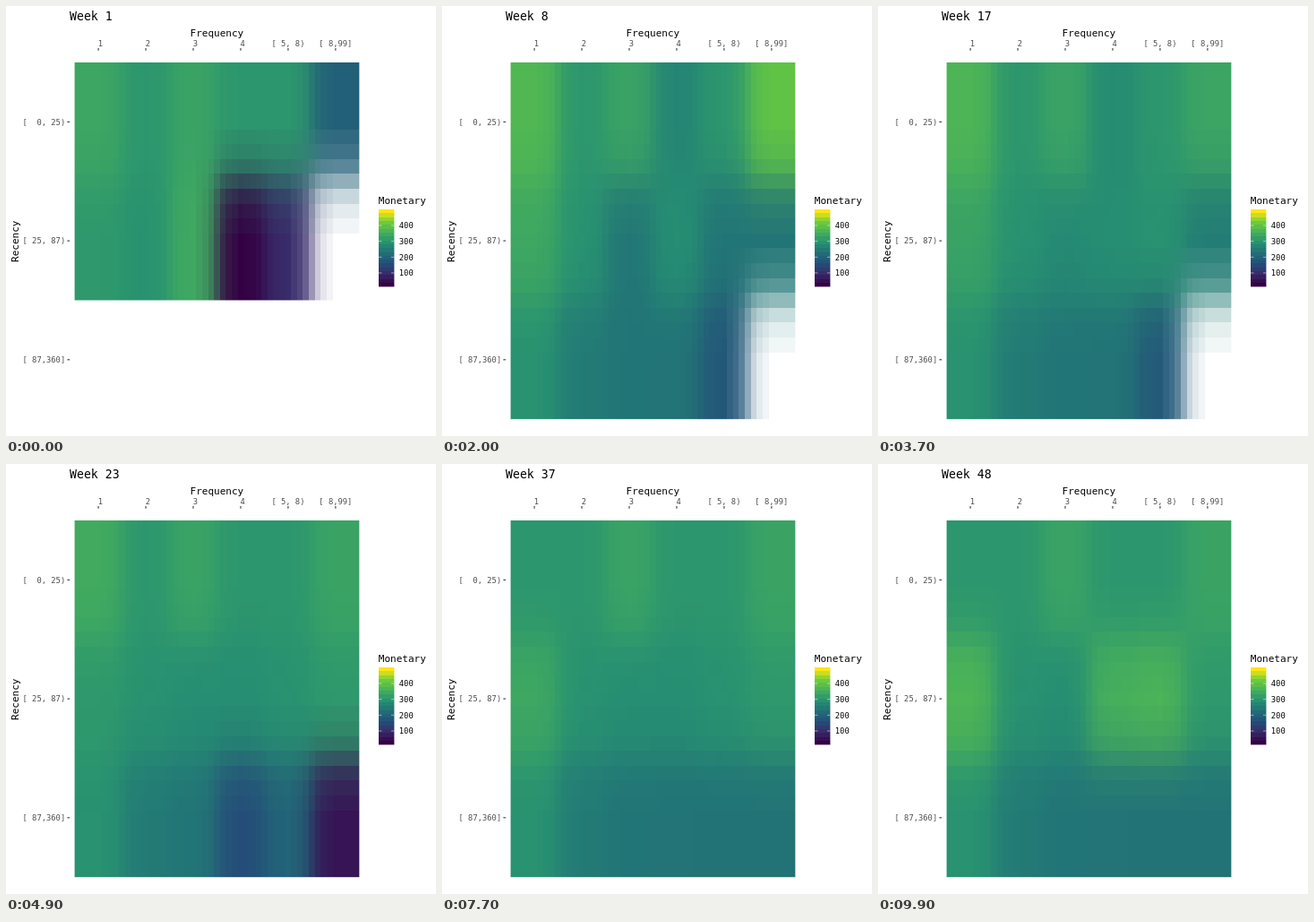
An HTML page with a canvas that plays this animation: 480 px wide and 480 px high, repeating every 10 s.

```html
<!DOCTYPE html>
<html lang="en">
<head>
<meta charset="utf-8">
<title>Monetary value by recency and frequency</title>
<style>
  html, body { margin: 0; width: 100%; height: 100%; overflow: hidden; background: #fff; }
  canvas, svg { position: absolute; left: 0; top: 0; width: 480px; height: 480px; }
  text { font-family: "DejaVu Sans Mono", monospace; font-size: 11px; white-space: pre; }
  .title { font-size: 13.2px; }
  .tick { font-size: 8.8px; fill: #4d4d4d; }
  .key { font-size: 8.8px; }
  .mid { text-anchor: middle; }
  .end { text-anchor: end; }
  .marks { stroke: #333; stroke-width: 1.07; }
  .keyMarks { stroke: #fff; stroke-width: .5; }
</style>
</head>
<body>
<canvas id="map" width="480" height="480"></canvas>
<svg id="chart" viewBox="0 0 480 480">
  <defs><linearGradient id="ramp" x1="0" y1="1" x2="0" y2="0"></linearGradient></defs>
  <text id="week" class="title" x="71" y="16">Week 1</text>
  <text class="mid" x="235.4" y="34">Frequency</text>
  <text class="mid" transform="translate(13.5 262.8) rotate(-90)">Recency</text>
  <text x="415.8" y="221">Monetary</text>
  <rect x="416" y="227" width="17.4" height="86.4" fill="url(#ramp)"/>
  <g id="axes"></g>
</svg>
<script>
const LEFT = 76.6, TOP = 63, COL = 52.96, ROW = 132.73, COLS = 6, ROWS = 3, SUB = 8;
const STEP = 100, LOOP = 10000;

// Evenly spaced colours from low to high
const scale = [0x330042, 0x3a2969, 0x244e79, 0x216e77, 0x269072, 0x46af5c, 0x6ece3a, 0xffe512]
  .map(n => [n >> 16, n >> 8 & 255, n & 255]);
const white = [255, 255, 255];

const mix = (a, b, t) => a + (b - a) * t;
const mixRgb = (a, b, t) => a.map((v, i) => mix(v, b[i], t));
const css = c => `rgb(${c.map(Math.round).join()})`;

// Level runs from 0 to 100
function colour(level) {
  const pos = Math.max(0, Math.min(100, level)) / 100 * (scale.length - 1);
  const i = Math.min(Math.floor(pos), scale.length - 2);
  return mixRgb(scale[i], scale[i + 1], pos - i);
}

// Usual level of a column in each row
const usual = [
  c => 62 + 4 * Math.cos((c - 2) * Math.PI * 2 / 3),
  c => 61 - 5 * Math.sin(c * Math.PI / 5),
  c => 45 + 13 / 4 ** c
];

// Swings that rise and fade linearly: row, column, peak second, height, reach in seconds
const swings = [
  [0, 0, 2.7, 18, 4.5],
  [0, 3, 2.7, -13, 1.6],
  [0, 5, 0, -43, 1.1],
  [0, 5, 1.1, 22, 2.7],
  [1, 0, 2.7, 12, 1.6],
  [1, 0, 9.9, 13, 4.5],
  [1, 2, 0, 21, 1.1],
  [1, 2, 1.1, -14, 3],
  [1, 3, 0, -56, 1.1],
  [1, 3, 9.9, 15, 2.2],
  [1, 4, 0, -34, 1.1],
  [1, 4, 1.1, -28, 1.6],
  [1, 4, 9.9, 15, 2.2],
  [1, 5, 2.7, -22, 2.2],
  [2, 3, 4.9, -17, 1.2],
  [2, 4, 2.7, -15, 4],
  [2, 5, 4.9, -38, 2.4]
];

// The oldest row and the most frequent column fill in one after the other
const appears = (r, c) => 1.9 * (Math.max(0, r - 1) + (r > 0 && c === COLS - 1));

function cell(r, c, sec) {
  if (sec < appears(r, c)) return white;
  let level = usual[r](c);
  for (const [row, col, peak, height, reach] of swings) {
    if (row === r && col === c) level += height * Math.max(0, 1 - Math.abs(sec - peak) / reach);
  }
  return colour(level);
}

// Share of the next cell, doubling towards the border and mirrored beyond it
const share = j => j === 0 ? 0 : j < 4 ? 2 ** (j - 5) : 1 - 2 ** (3 - j);

// Fine strips between the first and last cell centre; the outer ones reach the rim
function strips(start, size, count) {
  const last = (count - 1) * SUB;
  const edge = k => k <= 0 ? start : k > last ? start + size * count
    : Math.round(start + size / 2 + size / SUB * (k - .5));
  return Array.from({ length: last + 1 }, (_, k) => {
    const at = Math.floor(k / SUB);
    return { from: edge(k), to: edge(k + 1), at, next: Math.min(at + 1, count - 1), w: share(k % SUB) };
  });
}

const ctx = document.getElementById('map').getContext('2d');
const week = document.getElementById('week');

function draw(time) {
  const sec = time / 1000;
  const count = sec < appears(ROWS - 1, 0) ? ROWS - 1 : ROWS;
  const rgb = Array.from({ length: count }, (_, r) =>
    Array.from({ length: COLS }, (_, c) => cell(r, c, sec)));
  ctx.clearRect(0, 0, 480, 480);
  for (const y of strips(TOP, ROW, count)) {
    const line = rgb[y.at].map((c, i) => mixRgb(c, rgb[y.next][i], y.w));
    for (const x of strips(LEFT, COL, COLS)) {
      ctx.fillStyle = css(mixRgb(line[x.at], line[x.next], x.w));
      ctx.fillRect(x.from, y.from, x.to - x.from, y.to - y.from);
    }
  }
  const n = time / STEP;
  week.textContent = 'Week ' + (n < 11 ? Math.round(1 + n * 3 / 11) : Math.floor((n - 3) / 2));
}

function buildAxes() {
  const text = (cls, x, y, s) => `<text class="${cls}" x="${x}" y="${y}">${s}</text>`;
  const marks = (cls, d) => `<path class="${cls}" d="${d}"/>`;
  let out = '';
  ['1', '2', '3', '4', '[ 5, 8)', '[ 8,99]'].forEach((s, i) => {
    const x = LEFT + COL * (i + .5);
    out += text('tick mid', x + (s.length < 2 ? 2.3 : 0), 45, s) + marks('marks', `M${x} 46.9v2.8`);
  });
  ['[  0, 25)', '[ 25, 87)', '[ 87,360]'].forEach((s, i) => {
    const y = TOP + ROW * (i + .5);
    out += text('tick end', 66.2, y + 3.3, s) + marks('marks', `M68.4 ${y}h2.8`);
  });
  [400, 300, 200, 100].forEach((v, i) => {
    const y = 245 + 17.65 * i;
    out += text('key', 438.8, y + 3.2, v) + marks('keyMarks', `M416 ${y}h3.5m10.4 0h3.5`);
  });
  document.getElementById('axes').innerHTML = out;

  // The key is made of flat bands
  const bands = 20;
  let stops = '';
  for (let i = 0; i < bands; i++) {
    const fill = css(colour(i * 100 / (bands - 1)));
    for (const end of [i, i + 1]) stops += `<stop offset="${end / bands}" stop-color="${fill}"/>`;
  }
  document.getElementById('ramp').innerHTML = stops;
}

buildAxes();
const begin = performance.now();
let shown = -1;
function tick() {
  const time = Math.floor((performance.now() - begin) % LOOP / STEP) * STEP;
  if (time !== shown) draw(shown = time);
  requestAnimationFrame(tick);
}
tick();
</script>
</body>
</html>
```
